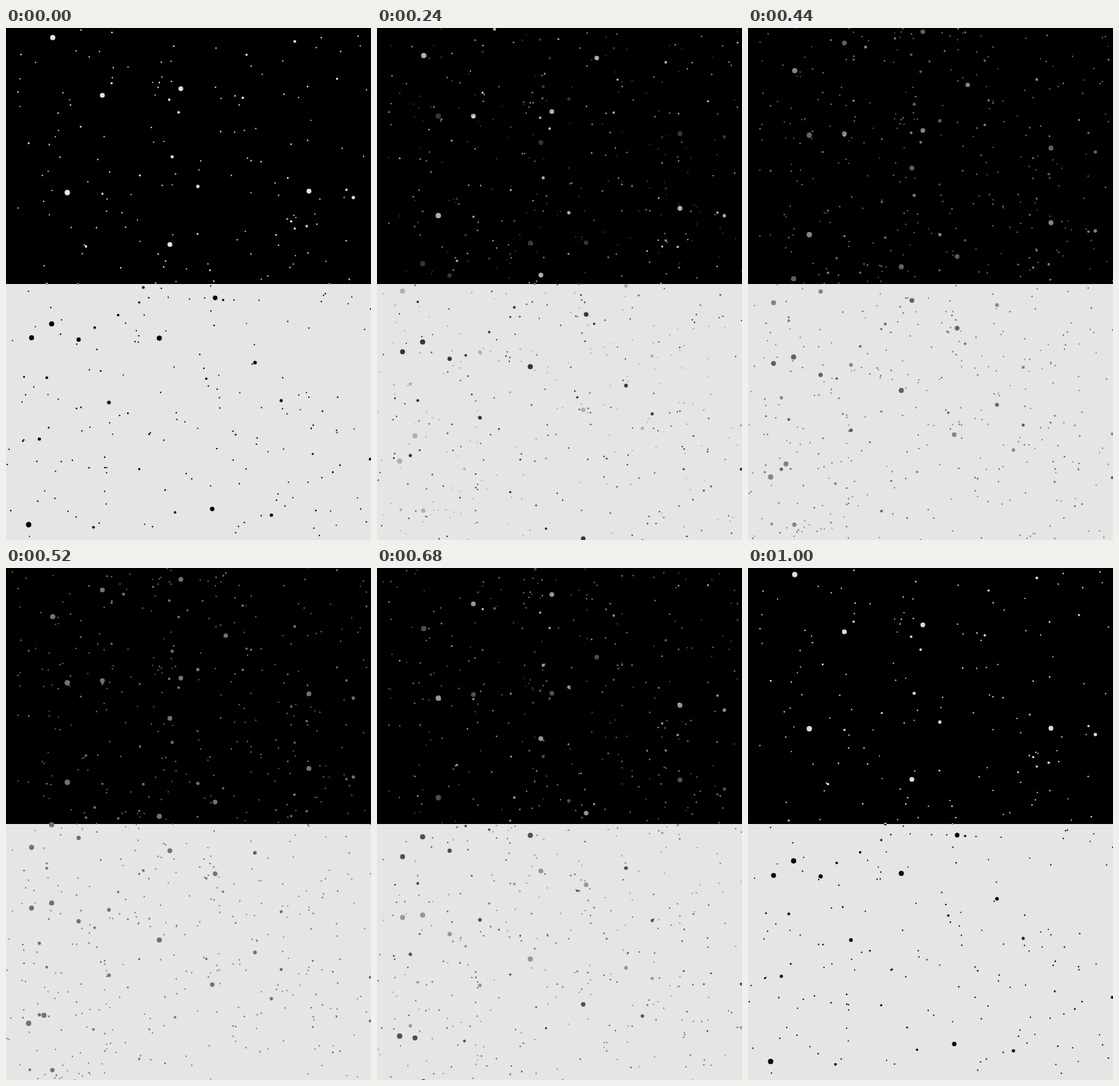
An HTML page with a canvas for the animation above (1.04 s loop, 500 by 700 pixels).

```html
<!DOCTYPE html>
<html lang="en">
<head>
<meta charset="utf-8">
<title>Falling stars</title>
<style>
  html, body { margin: 0; width: 100%; height: 100%; overflow: hidden; background: #000; }
  canvas { display: block; }
</style>
</head>
<body>
<canvas id="sky" width="500" height="700"></canvas>
<script>
const W = 500, H = 700, HORIZON = 350;
const LOOP = 1040, STEP = 40;
const FAINTEST = 0.05;
const SPECKS = 500;
const ctx = document.getElementById('sky').getContext('2d');

// The biggest stars, largest first: x, y at full brightness, drift per loop
const keyStars = [
  [84, 225, 136], [31, 679, 113], [64, 13, 107], [62.5, 404.5, 107],
  [210, 424, 169], [52, 712, 201], [35, 423.5, 83], [415, 223, 102],
  [132, 92, 124], [224.5, 296, 181], [239.5, 83, 135], [286.5, 369, 98],
  [282.5, 657.5, 176], [301, -3, 191], [63.5, 736, 99], [99.5, 426, 114]
];

let seed = 20177;
function random() {
  seed = (seed * 16807) % 2147483647;
  return seed / 2147483647;
}

// Mostly tiny specks, with a few mid-sized stars at the top of the range
function makeSpeck() {
  const size = random();
  return {
    x: random() * W,
    y: -200 + random() * 1100,
    drift: 55 + (random() + random()) * 65,
    r: 0.85 + 0.3 * size + 1.4 * size ** 16
  };
}

const stars = keyStars.map(([x, y, drift], i) => ({ x, y, drift, r: 3.7 - i * 0.05 }));
for (let i = 0; i < SPECKS; i++) stars.push(makeSpeck());

function fill(mode, color, y, h) {
  ctx.globalCompositeOperation = mode;
  ctx.globalAlpha = 1;
  ctx.fillStyle = color;
  ctx.fillRect(0, y, W, h);
}

function drawStars(phase) {
  const alpha = 1 - Math.abs(phase);
  if (alpha < FAINTEST) return;
  ctx.globalAlpha = alpha;
  for (const s of stars) {
    ctx.beginPath();
    ctx.arc(s.x, s.y + s.drift * phase, s.r, 0, Math.PI * 2);
    ctx.fill();
  }
}

function draw(time) {
  const phase = Math.floor((time % LOOP) / STEP) * STEP / LOOP;
  fill('source-over', '#000', 0, H);
  ctx.globalCompositeOperation = 'lighter';
  ctx.fillStyle = '#fff';
  drawStars(phase);      // leaving, fading out
  drawStars(phase - 1);  // arriving, fading in
  // Invert the ground, then soften white to the paper tone
  fill('difference', '#fff', HORIZON, H - HORIZON);
  fill('multiply', '#e5e5e5', 0, H);
}

let start;
function tick(now) {
  if (start === undefined) start = now;
  draw(now - start);
  requestAnimationFrame(tick);
}
draw(0);
requestAnimationFrame(tick);
</script>
</body>
</html>
```
